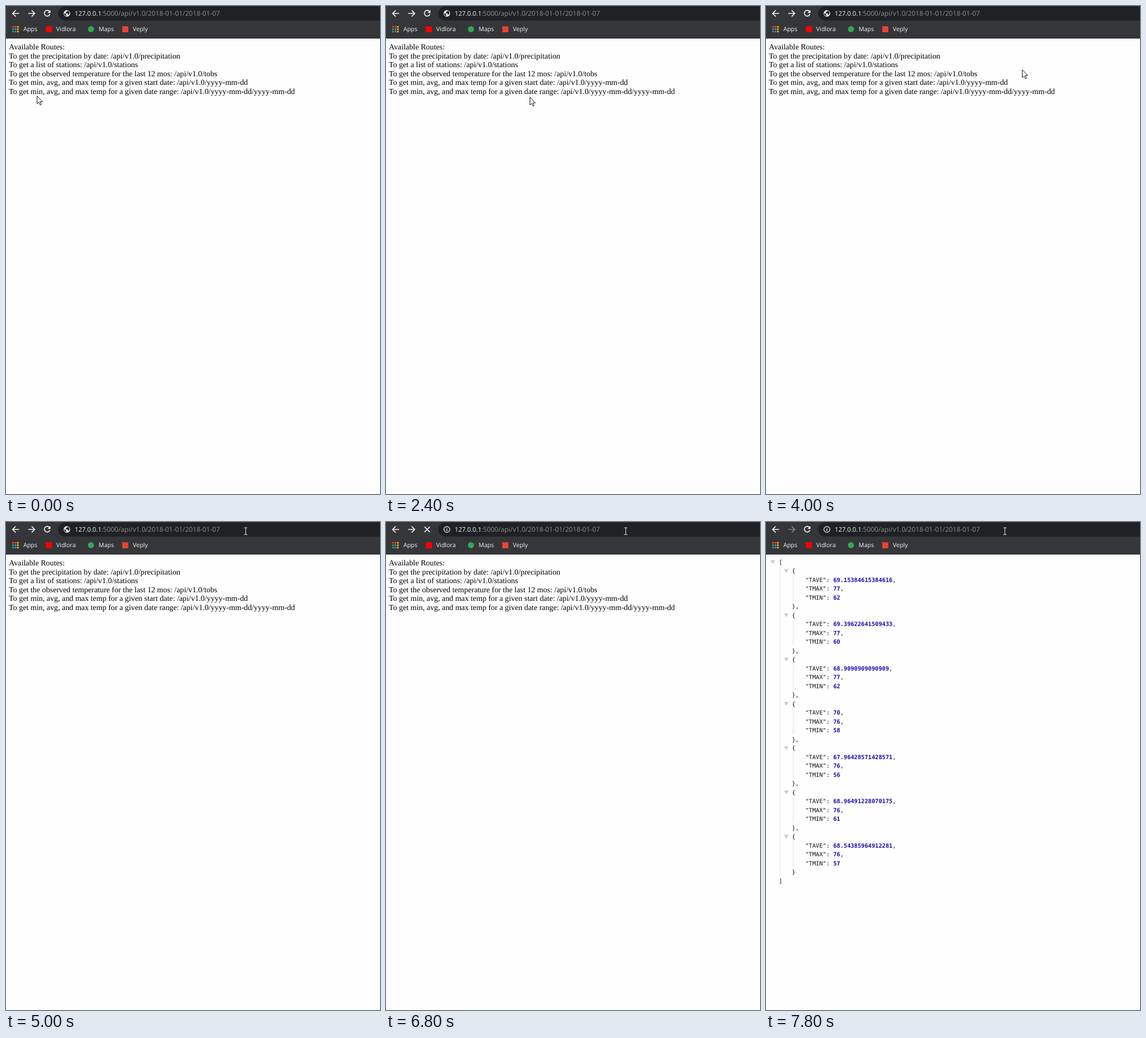
Recreate the animation shown at these times as an HTML page. Size 656 by 854 pixels, loop 8 s.

```html
<!DOCTYPE html>
<html lang="en">
<head>
<meta charset="utf-8">
<title>Weather API routes</title>
<style>
  html, body { margin: 0; width: 100%; height: 100%; overflow: hidden; background: #fefefe; }
  svg { display: block; width: 656px; height: 854px; }
  text { white-space: pre; text-rendering: geometricPrecision; }
  .ui { font-family: "Open Sans", "Noto Sans", sans-serif; fill: #f1f3f4; }
  .page { font: 13.78px "Liberation Serif", "Times New Roman", serif; fill: #000; }
  .json { font: 10.16px "DejaVu Sans Mono", monospace; fill: #111; }
  .num { font-weight: bold; fill: #1a0fac; }
  .line { fill: none; stroke: #f1f3f4; stroke-width: 1.6; }
</style>
</head>
<body>
<svg id="stage" viewBox="0 0 656 854" xmlns="http://www.w3.org/2000/svg">
  <rect width="656" height="854" fill="#fefefe"/>
  <g id="routes" class="page"></g>
  <g id="result" class="json"></g>

  <rect width="656" height="57" fill="#35363a"/>
  <rect id="pill" x="91.5" y="0.8" width="600" height="24.6" rx="12.3" fill="#202124" stroke-width="1.6"/>
  <path class="line" d="M23 13H12M17 7.6L11.6 13L17 18.4"/>
  <path id="forward" class="line" d="M39 13H50M45 7.6L50.4 13L45 18.4"/>
  <g id="reload">
    <path class="line" d="M76.2 9.4A5 5 0 1 0 77 14.4"/>
    <path d="M78 7V12.2H72.8Z" fill="#f1f3f4"/>
  </g>
  <path id="stop" class="line" d="M67.6 8.4L76.8 17.6M76.8 8.4L67.6 17.6"/>
  <g id="globe">
    <circle cx="106.8" cy="13" r="5.7" fill="#f1f3f4"/>
    <path d="M102.3 12L105.6 15.2V17.6Q101.4 16.2 102.3 12M107.6 8.3V9.8H105.8V11.6H104.6V13H108.4V15H110.4Q112.6 11 109 8.6Z" fill="#202124"/>
  </g>
  <g id="info">
    <circle class="line" cx="106.8" cy="13" r="5.2" style="stroke-width:1.2"/>
    <path class="line" d="M106.8 12.2V16M106.8 9.9V11.2" style="stroke-width:1.3"/>
  </g>
  <rect id="selection" x="120.5" y="5" width="256" height="16" fill="#1459c2"/>
  <g class="ui">
    <text x="120.6" y="17.3" font-size="11.1">127.0.0.1</text>
    <text id="path" x="167.2" y="17.3" font-size="11.7">:5000/api/v1.0/2018-01-01/2018-01-07</text>
  </g>
  <g id="bookmarks" class="ui" font-size="10.5"></g>

  <path id="arrow" d="M0.5 0.5V14.3L3.7 11.4L5.9 16.2L8 15.3L5.8 10.6H10Z" fill="#fff" stroke="#111" stroke-width="0.95"/>
  <path id="beam" d="M-2.8 -6H-0.7L0 -5.4L0.7 -6H2.8M0 -5.4V5.4M-2.8 6H-0.7L0 5.4L0.7 6H2.8" fill="none" stroke="#e4e4e4" stroke-width="1.1"/>
</svg>
<script>
const LOOP = 8000, STEP = 200, ROW = 15.5;
const $ = id => document.getElementById(id);

function add(parent, tag, attrs, content = "") {
  const node = document.createElementNS("http://www.w3.org/2000/svg", tag);
  for (const key in attrs) node.setAttribute(key, attrs[key]);
  node.textContent = content;
  parent.append(node);
  return node;
}

function buildRoutes() {
  [
    "Available Routes:",
    "To get the precipitation by date: /api/v1.0/precipitation",
    "To get a list of stations: /api/v1.0/stations",
    "To get the observed temperature for the last 12 mos: /api/v1.0/tobs",
    "To get min, avg, and max temp for a given start date: /api/v1.0/yyyy-mm-dd",
    "To get min, avg, and max temp for a given date range: /api/v1.0/yyyy-mm-dd/yyyy-mm-dd"
  ].forEach((line, i) => add($("routes"), "text", { x: 5, y: 76 + i * ROW }, line));
}

function buildResult() {
  const root = $("result");
  const write = (x, row, text) => add(root, "text", { x, y: 73.7 + row * ROW }, text);
  const toggle = (x, row) =>
    add(root, "path", { d: `M${x} ${67 + row * ROW}h8l-4 6.5z`, fill: "#cacaca" });
  const guide = (x, from, to) => add(root, "path", {
    d: `M${x} ${70 + from * ROW + 8}V${70 + to * ROW - 8}`,
    stroke: "#bbb", "stroke-width": 0.9, "stroke-dasharray": "1 1"
  });
  const days = [
    ["69.15384615384616", 77, 62], ["69.39622641509433", 77, 60],
    ["68.9090909090909", 77, 62], ["70", 76, 58],
    ["67.96428571428571", 76, 56], ["68.96491228070175", 76, 61],
    ["68.54385964912281", 76, 57]
  ];
  toggle(8, 0);
  write(22.4, 0, "[");
  guide(24.8, 0, 36);
  days.forEach((day, i) => {
    const top = 1 + i * 5;
    toggle(31.5, top);
    write(45.5, top, "{");
    guide(47.8, top, top + 4);
    ["TAVE", "TMAX", "TMIN"].forEach((key, k) => {
      const line = write(69, top + 1 + k, `"${key}": `);
      add(line, "tspan", { class: "num" }, day[k]);
      if (k < 2) add(line, "tspan", {}, ",");
    });
    write(45.5, top + 4, i < days.length - 1 ? "}," : "}");
  });
  write(22.4, 36, "]");
}

function buildBookmarks() {
  const root = $("bookmarks");
  const [red, yellow, green, blue] = ["#ea4335", "#fbbc05", "#34a853", "#4285f4"];
  [red, red, yellow, green, blue, yellow, green, blue, yellow].forEach((fill, i) =>
    add(root, "rect", { x: 11 + i % 3 * 4.2, y: 35 + Math.floor(i / 3) * 4.2, width: 2.8, height: 2.8, fill }));
  add(root, "rect", { x: 70, y: 35.5, width: 10.5, height: 10.5, fill: "#f00" });
  add(root, "circle", { cx: 149, cy: 40.5, r: 5.3, fill: green });
  add(root, "rect", { x: 204, y: 35.5, width: 10.5, height: 10.5, fill: red });
  [[30.5, "Apps"], [88, "Vidlora"], [162.5, "Maps"], [222.5, "Veply"]]
    .forEach(([x, label]) => add(root, "text", { x, y: 44.2 }, label));
}

// Pointer path: time, x, y
const track = [
  [400, 54, 157], [1000, 92, 159], [1400, 150, 159], [1600, 196, 159],
  [2400, 252, 159], [2800, 305, 160], [3400, 378, 145], [4000, 449, 111],
  [4400, 442, 70], [5000, 420, 16], [7400, 420, 16], [7800, 418.5, 16]
];

function pointerAt(t) {
  const next = track.findIndex(key => key[0] > t);
  if (next === 0) return track[0].slice(1);
  if (next < 0) return track[track.length - 1].slice(1);
  const a = track[next - 1], b = track[next], p = (t - a[0]) / (b[0] - a[0]);
  return [1, 2].map(i => a[i] + (b[i] - a[i]) * p);
}

const show = (id, on) => $(id).setAttribute("visibility", on ? "visible" : "hidden");

function render(time) {
  const t = Math.floor(time % LOOP / STEP) * STEP;
  const selected = t >= 5400 && t < 6800;
  const submitted = t >= 6800, loaded = t >= 7000, loading = submitted && !loaded;
  const [x, y] = pointerAt(t);
  const inBar = y < 26;

  show("routes", !loaded);
  show("result", loaded);
  show("reload", !loading);
  show("stop", loading);
  show("globe", !submitted);
  show("info", submitted);
  show("selection", selected);
  $("pill").setAttribute("stroke", selected ? "#4c678c" : "none");
  $("path").style.fill = selected ? "#fff" : "#8b8f94";
  $("forward").style.stroke = loaded ? "#818286" : "#f1f3f4";

  show("arrow", !inBar);
  show("beam", inBar);
  $(inBar ? "beam" : "arrow").setAttribute("transform", `translate(${x + (inBar ? 0.5 : 0)} ${y})`);
}

buildRoutes();
buildResult();
buildBookmarks();
const start = performance.now();
function tick() {
  render(performance.now() - start);
  requestAnimationFrame(tick);
}
tick();
</script>
</body>
</html>
```
